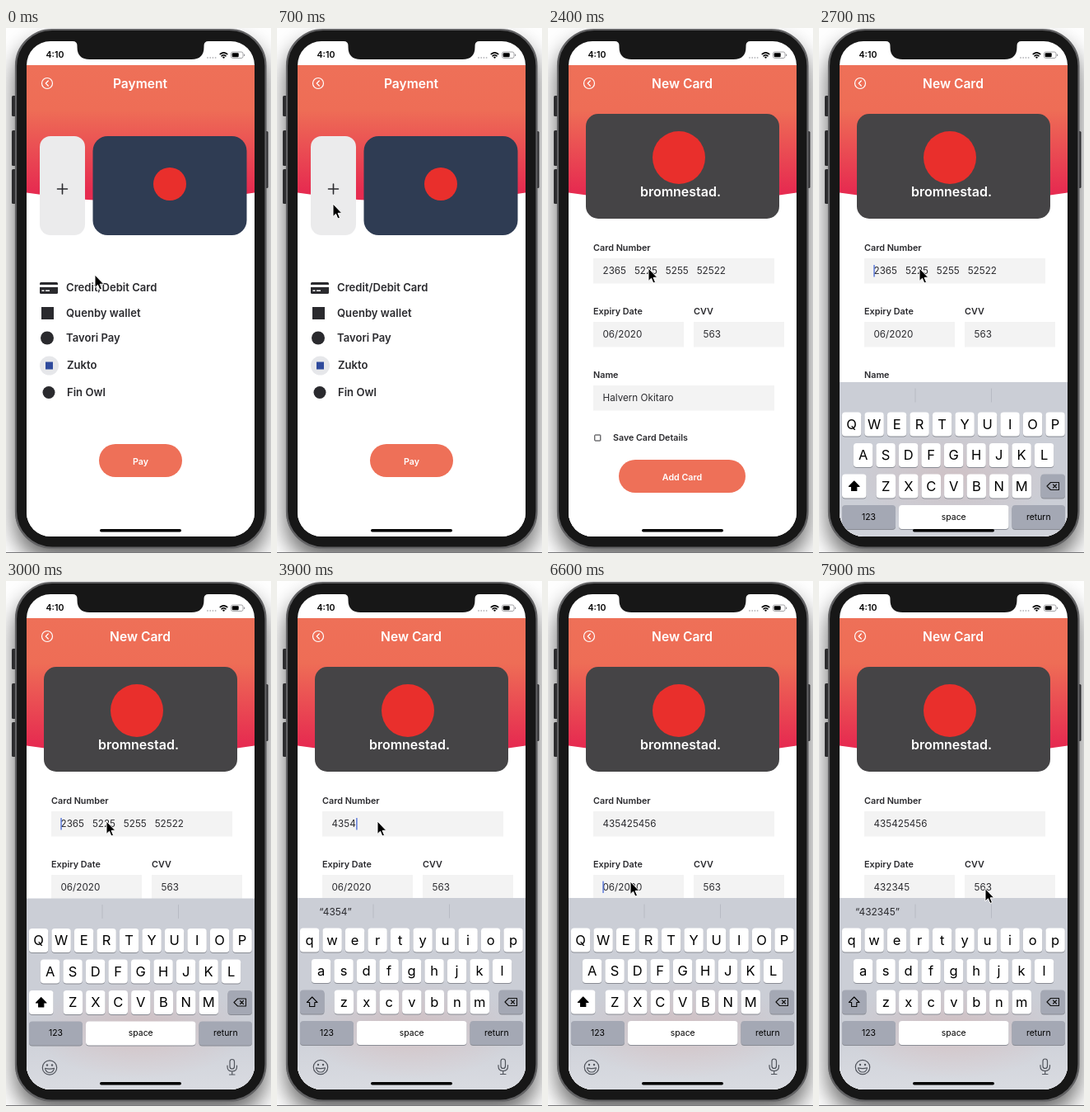
Recreate the animation shown at these times as an HTML page. Size 322 px wide and 636 px high, loop 8 s.

```html
<!DOCTYPE html>
<html lang="en">
<head>
<meta charset="utf-8">
<title>Add a card</title>
<style>
html, body { margin: 0; width: 100%; height: 100%; overflow: hidden; background: #fff; }
svg { display: block; width: 322px; height: 636px; }
text { font-family: Inter, Roboto, sans-serif; white-space: pre; fill: #2a2a2e; }
.line { fill: none; stroke-linecap: round; stroke-linejoin: round; }
</style>
</head>
<body>
<svg id="stage" viewBox="0 0 322 636"></svg>
<script>
const LOOP = 8000;
const CORAL = '#ee7058', INK = '#2a2a2e', RED = '#e92f2c', KEY_GREY = '#a4a8b4';

// Markup helpers; text is placed by its vertical centre.
const box = (x, y, w, h, r, fill, more = '') =>
  `<rect x="${x}" y="${y}" width="${w}" height="${h}" rx="${r}" fill="${fill}" ${more}/>`;
const disc = (x, y, r, fill, more = '') =>
  `<circle cx="${x}" cy="${y}" r="${r}" fill="${fill}" ${more}/>`;
const line = (d, color, width, more = '') =>
  `<path class="line" d="${d}" stroke="${color}" stroke-width="${width}" ${more}/>`;
const label = (x, y, size, str, more = '') =>
  `<text x="${x}" y="${y + size * 0.36}" font-size="${size}" ${more}>${str}</text>`;
const bold = 'font-weight="600"';
const mid = 'text-anchor="middle"';
const white = 'style="fill:#fff"';

const header = title =>
  box(25, 45, 277, 571, 0, '#fff') +
  '<path d="M25 45H302V199.500Q163.500 221 25 199.500Z" fill="url(#sunset)"/>' +
  disc(50, 67, 6.5, 'none', 'stroke="#fff" stroke-width="1.2"') +
  line('M51.300 64L48.300 67L51.300 70', '#fff', 1.3) +
  label(163, 67, 15.6, title, `${bold} ${mid} ${white}`);

const button = (x, y, w, str) =>
  box(x, y, w, 40, 20, CORAL) +
  label(x + w / 2, y + 21, 10.7, str, `${bold} ${mid} ${white}`);

const methods = [[314, 'Credit/Debit Card'], [345, 'Quenby wallet'], [375, 'Tavori Pay'],
  [408, 'Zukto'], [441, 'Fin Owl']];

const paymentScreen = () => header('Payment') +
  box(41, 131, 55, 120, 13, '#ebebec') +
  line('M62.500 195H74.500M68.500 189V201', INK, 1.6) +
  box(105.5, 131, 187, 120, 18, '#2f3c53') +
  disc(199, 189, 20, RED) +
  box(41, 308, 22, 14, 1.5, INK) + box(41, 311, 22, 3, 0, '#fff') +
  box(43.5, 317.5, 3, 1.5, 0, '#fff') + box(48, 317.5, 5, 1.5, 0, '#fff') +
  box(43, 338, 15, 15, 0, INK) +
  disc(50, 375.5, 8, INK) +
  disc(52.5, 409, 11.5, '#e6e7ea') + box(48, 404.5, 9, 9, 0, '#2f4a9c') +
  disc(52, 441.5, 7.5, INK) +
  methods.map(([y, name]) => label(y > 400 ? 74 : 73, y, 13.1, name, bold)).join('') +
  button(113, 504, 101, 'Pay');

const field = (x, y, w, name, value, id) =>
  label(x, y, 10.8, name, bold) +
  box(x, y + 13, w, 30.5, 0, '#f3f3f3') +
  label(x + 11.5, y + 28, 11.7, value, `id="${id}"`);

const cardScreen = () => header('New Card') +
  box(46, 104, 235, 127, 15, '#454446') +
  disc(159, 157, 32, RED) +
  label(161, 198, 16, 'bromnestad.', `${bold} ${mid} ${white}`) +
  field(55, 266, 220, 'Card Number', '', 'number') +
  field(55, 343, 110, 'Expiry Date', '', 'expiry') +
  field(177, 343, 110, 'CVV', '563', 'cvv') +
  field(55, 420, 220, 'Name', 'Halvern Okitaro', 'holder') +
  box(56.8, 493, 7, 7, 0.5, 'none', `stroke="${INK}"`) +
  label(79, 496, 10.7, 'Save Card Details', bold) +
  button(86, 523, 154, 'Add Card') +
  box(66.4, 0, 1.3, 14.5, 0.5, '#4668d6', 'id="caret"');

const key = (x, y, w, fill, more = '') =>
  box(x, y + 1, w, 29, 4, '#898c94') + box(x, y, w, 29, 4, fill, more);

const keyRow = (letters, x, y) => [...letters].map((c, i) =>
  key(x + i * 27.5 - 11.7, y, 23.4, '#fff') +
  label(x + i * 27.5, y + 14.2, 16.5, c, `class="letter" ${mid} style="fill:#000"`)).join('');

const wordKey = (x, w, fill, str) =>
  key(x, 533, w, fill) + label(x + w / 2, 547, 10.4, str, `${mid} style="fill:#000"`);

const keys = () =>
  line('M117 392V408M209.500 392V408', '#b7bac3', 1) +
  label(71, 401, 11.9, '', `id="hint" ${mid}`) +
  keyRow('QWERTYUIOP', 39.6, 420.5) +
  keyRow('ASDFGHJKL', 53.6, 458) +
  keyRow('ZXCVBNM', 81.3, 495.5) +
  key(28, 495.5, 29.5, '#fff', 'id="shiftKey"') +
  '<path id="shift" d="M42.700 504L49 510.500H45.800V515.500H39.600V510.500H36.400Z" stroke="#000" stroke-width="1.1" stroke-linejoin="round"/>' +
  key(269.5, 495.5, 29.5, KEY_GREY) +
  line('M277 510L281.500 505.500H291.500V514.500H281.500ZM284.500 508L288.500 512M288.500 508L284.500 512', '#111', 1.1) +
  wordKey(28, 65, KEY_GREY, '123') +
  wordKey(97, 133.5, '#fff', 'space') +
  wordKey(234.5, 64.5, KEY_GREY, 'return') +
  disc(53, 589, 8.7, 'none', 'stroke="#50545c" stroke-width="1.2"') +
  disc(50, 586, 1.2, '#50545c') + disc(56, 586, 1.2, '#50545c') +
  line('M47.500 589.800Q48.500 595 53 595Q57.500 595 58.500 589.800Q53 591.500 47.500 589.800Z', '#50545c', 1.1) +
  box(272, 579, 5.5, 11.5, 2.75, 'none', 'stroke="#50545c" stroke-width="1.2"') +
  line('M269 586.500V588Q269 593.500 274.750 593.500Q280.500 593.500 280.500 588V586.500M274.750 593.500V597.500M271.500 597.500H278', '#50545c', 1.2);

const statusBar = () =>
  label(48.5, 32.5, 10.6, '4:10', `${bold} style="fill:#000"`) +
  [0, 1, 2, 3].map(i => disc(245 + i * 3.2, 36, 0.9, '#b9b9bd')).join('') +
  line('M260.200 31.600Q264.500 28 268.800 31.600M262 33.800Q264.500 31.800 267 33.800', '#000', 1.6) +
  disc(264.5, 35.6, 1.2, '#000') +
  box(273.5, 29, 14.5, 7.5, 2, 'none', 'stroke="#9a9a9e" stroke-width="0.9"') +
  box(274.7, 30.2, 8, 5.1, 1, '#000') + box(289, 31.5, 1.2, 2.6, 0.5, '#9a9a9e');

const phone = () =>
  box(11, 4, 305, 626, 44, '#555', 'filter="url(#shade)"') +
  [[7, 82, 25], [7, 124, 43], [7, 171, 42], [313, 125, 69]]
    .map(([x, y, h]) => box(x, y, 5.5, h, 1.5, '#2c2c2e')).join('') +
  box(12, 2, 303.5, 627.5, 44, '#171717', 'stroke="#626264" stroke-width="2.2"') +
  box(25, 16, 277, 600, 29, '#fff');

const $ = id => document.getElementById(id);

$('stage').innerHTML = `
<defs>
  <linearGradient id="sunset" x2="0" y2="1">
    <stop stop-color="${CORAL}"/><stop offset=".33" stop-color="#ee6d56"/>
    <stop offset=".92" stop-color="#e62c50"/>
  </linearGradient>
  <linearGradient id="tray" x2="0" y2="1">
    <stop offset=".5" stop-color="#cbced6"/><stop offset=".77" stop-color="#d9dbe1"/>
  </linearGradient>
  <radialGradient id="glow">
    <stop stop-color="${CORAL}" stop-opacity=".16"/>
    <stop offset="1" stop-color="${CORAL}" stop-opacity="0"/>
  </radialGradient>
  <clipPath id="screen">${box(25, 16, 277, 600, 29, '#fff')}</clipPath>
  <filter id="shade" x="-25%" y="-20%" width="150%" height="140%">
    <feDropShadow dx="0" dy="14" stdDeviation="14" flood-opacity=".62"/>
  </filter>
</defs>
${phone()}
<g clip-path="url(#screen)">
  <g id="payment">${paymentScreen()}</g>
  <g id="card">${cardScreen()}</g>
  <g id="tray-back">${box(25, 384, 277, 300, 0, 'url(#tray)')}</g>
  <ellipse id="tint" cx="163" cy="543" rx="130" ry="60" fill="url(#glow)"/>
  <g id="keys">${keys()}</g>
  ${statusBar()}
  ${box(114, 607, 99, 3.5, 1.75, '#000')}
</g>
<path d="M81 14V16Q86.500 16 86.500 21.500V23Q86.500 38 101.500 38H225.500Q240.500 38 240.500 23V21.500Q240.500 16 246 16V14Z" fill="#171717"/>
${box(0, 635, 322, 1, 0, '#77777a')}
<path id="pointer" d="M0 0V15.500L3.500 12.300L5.900 18L8.500 16.900L6.100 11.300H10.800Z" fill="#000" stroke="#fff" stroke-width="1"/>`;

const letters = [...document.querySelectorAll('.letter')];

// Critically damped spring from 0 to 1; t in ms, w is its rate per second.
const spring = (t, w) => {
  const s = Math.max(0, t) / 1000 * w;
  return 1 - (1 + s) * Math.exp(-s);
};

const moves = [ // start, end, x, y
  [150, 650, 68, 213], [1900, 2350, 122, 291], [4480, 4850, 100, 364], [7460, 7850, 202, 372.5]];

function pointerAt(t) {
  let x = 108, y = 299;
  for (const [start, end, toX, toY] of moves) {
    const p = Math.min(1, Math.max(0, (t - start) / (end - start)));
    const e = p * p * (3 - 2 * p);
    x += (toX - x) * e;
    y += (toY - y) * e;
  }
  return [x, y];
}

const PUSH = 750, RISE = 2530;
const entries = [
  { id: 'number', focus: 2510, blur: 5300, first: 3500, gap: 110, typed: '435425456',
    empty: '2365   5225   5255   52522', caretY: 287 },
  { id: 'expiry', focus: 5300, blur: LOOP, first: 6730, gap: 130, typed: '432345',
    empty: '06/2020', caretY: 363.5 }];

const shift = (id, x, y) => $(id).setAttribute('transform', `translate(${x} ${y})`);
const show = (id, on) => $(id).setAttribute('visibility', on ? 'visible' : 'hidden');

function render(t) {
  const slide = spring(t - PUSH, 11);
  shift('payment', -83 * slide, 0);
  shift('card', 277 * (1 - slide), 0);
  shift('pointer', ...pointerAt(t));

  const rise = spring(t - RISE, 17.75);
  shift('tray-back', 0, 232 * (1 - rise));
  shift('keys', 0, 232 * (1 - rise));
  $('tint').setAttribute('opacity', rise);

  let hint = '', caretOn = false;
  for (const e of entries) {
    const count = Math.min(e.typed.length, Math.max(0, Math.floor((t - e.first) / e.gap) + 1));
    const text = e.typed.slice(0, count);
    $(e.id).textContent = text || e.empty;
    if (t < e.focus || t >= e.blur) continue;
    if (text) hint = `“${text}”`;
    const lastKey = count ? e.first + (count - 1) * e.gap : e.focus;
    caretOn = (t - lastKey) % 1000 < 505;
    $('caret').setAttribute('y', e.caretY);
    $('caret').setAttribute('x', 66.4 + (count ? $(e.id).getComputedTextLength() + 0.6 : 0));
  }
  show('caret', caretOn);

  const lower = hint !== '';
  $('hint').textContent = hint;
  for (const l of letters) {
    l.textContent = lower ? l.textContent.toLowerCase() : l.textContent.toUpperCase();
  }
  $('shiftKey').setAttribute('fill', lower ? KEY_GREY : '#fff');
  $('shift').setAttribute('fill', lower ? 'none' : '#000');
}

const origin = performance.now();
function tick() {
  render((performance.now() - origin) % LOOP);
  requestAnimationFrame(tick);
}
tick();
</script>
</body>
</html>
```
